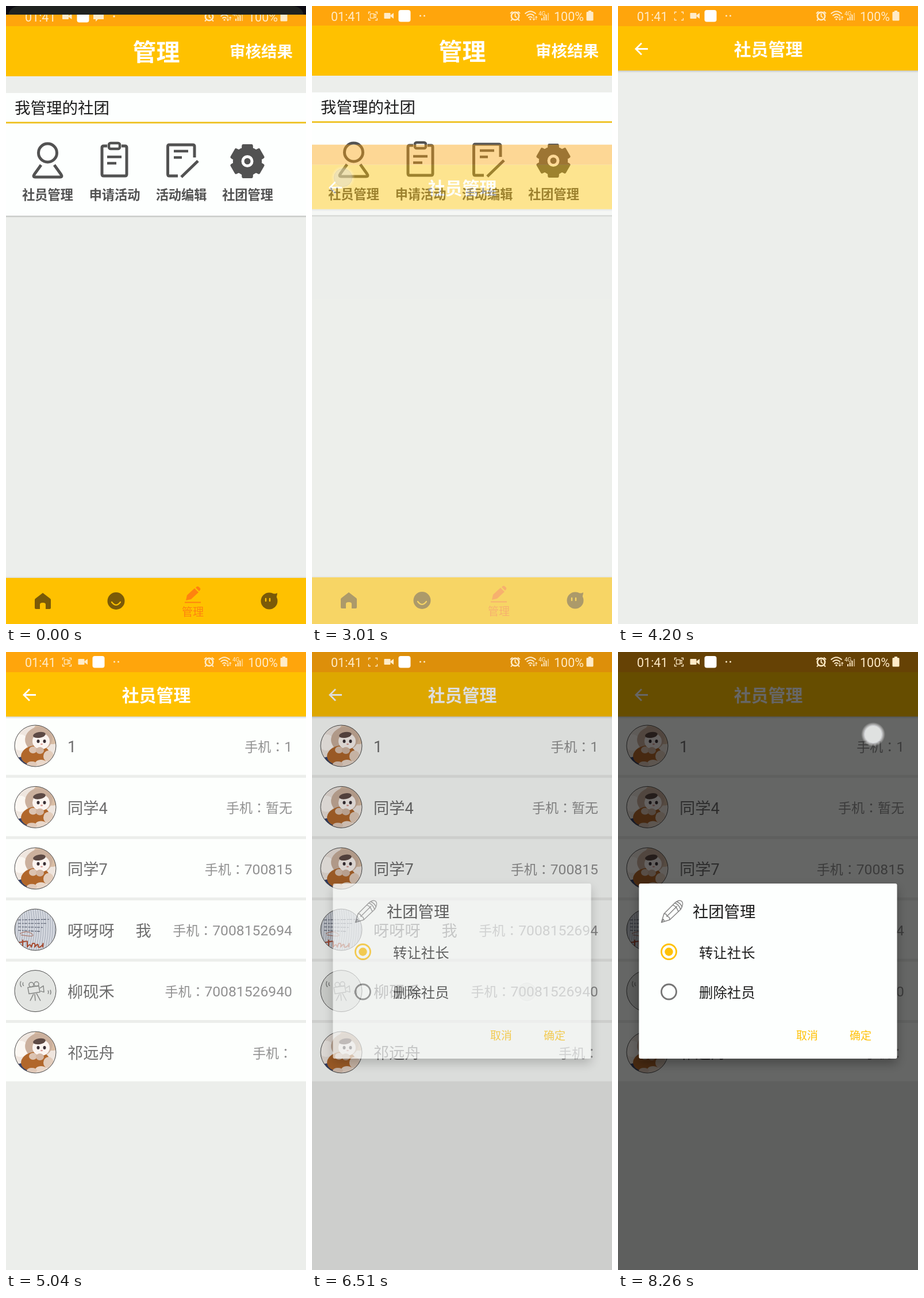
Write an HTML page that moves like this. It is 522 px wide and 1073 px high and loops after 8330 ms.

```html
<!DOCTYPE html>
<html lang="zh-CN">
<head>
<meta charset="utf-8">
<title>社员管理</title>
<style>
html, body { margin: 0; width: 100%; height: 100%; overflow: hidden; background: #eceeeb; }
svg { display: block; width: 522px; height: 1073px; }
text { font-family: Roboto, "Noto Sans CJK SC", "Noto Sans CJK", sans-serif; white-space: pre; }
.mid { font-family: "Noto Sans CJK JP", "Noto Sans CJK", sans-serif; }
</style>
</head>
<body>
<svg id="stage" viewBox="0 0 522 1073" xmlns="http://www.w3.org/2000/svg"></svg>
<script>
const LOOP = 8330, STEP = 70;
const BG = '#eceeeb', AMBER = '#ffc100', STATUS = '#ffa50c', INK = '#525252', BROWN = '#7a5a08';

// Markup helpers; cy is the visual centre of the line of text.
const text = (x, cy, size, fill, str, more = '') =>
  `<text x="${x}" y="${cy + size * 0.38}" font-size="${size}" fill="${fill}" ${more}>${str}</text>`;
const rect = (x, y, w, h, fill, more = '') =>
  `<rect x="${x}" y="${y}" width="${w}" height="${h}" fill="${fill}" ${more}/>`;
const circle = (x, y, r, fill, more = '') =>
  `<circle cx="${x}" cy="${y}" r="${r}" fill="${fill}" ${more}/>`;
const oval = (x, y, rx, ry, fill, turn = 0) =>
  `<ellipse cx="${x}" cy="${y}" rx="${rx}" ry="${ry}" fill="${fill}" transform="rotate(${turn} ${x} ${y})"/>`;
const line = (d, color, w, more = '') =>
  `<path d="${d}" fill="none" stroke="${color}" stroke-width="${w}" ${more}/>`;
const group = (id, body, more = '') => `<g id="${id}" ${more}>${body}</g>`;
const at = (x, y, body) => `<g transform="translate(${x} ${y})">${body}</g>`;
const BOLD = 'font-weight="700"', MIDDLE = 'text-anchor="middle"';
const ROUND = 'stroke-linecap="round" stroke-linejoin="round"';

function gear(x, y) {
  const pts = [];
  for (let i = 0; i < 6; i++) {
    for (const [turn, r] of [[-19, 23], [-15, 28], [15, 28], [19, 23]]) {
      const a = (i * 60 - 90 + turn) * Math.PI / 180;
      pts.push((x + r * Math.cos(a)).toFixed(1) + ',' + (y + r * Math.sin(a)).toFixed(1));
    }
  }
  return `<polygon points="${pts.join(' ')}" fill="${INK}" stroke="${INK}" stroke-width="5" stroke-linejoin="round"/>`
    + circle(x, y, 8, 'none', 'stroke="#fff" stroke-width="5"');
}

function homePage() {
  const tools = [['社员管理', 72.5], ['申请活动', 189], ['活动编辑', 305], ['社团管理', 420.5]];
  const icons =
    circle(72.5, 254, 16, 'none', `stroke="${INK}" stroke-width="5"`) +
    line('M61 275L49.5 291Q46 296 51 296H94Q99 296 95.5 291L84 275', INK, 5, 'stroke-linejoin="round"') +
    line('M176 242H170Q167 242 167 245V291Q167 294 170 294H207Q210 294 210 291V245Q210 242 207 242H201', INK, 5) +
    rect(179, 237, 19, 10, 'none', `rx="3" stroke="${INK}" stroke-width="4.5"`) +
    line('M176 261H201M176 272H192', INK, 4.5) +
    line('M299 294H284Q281.500 294 281.500 291V243Q281.500 240 284 240H325Q328 240 328 243V262', INK, 5) +
    line('M292 251H317M292 262H306', INK, 4.5) +
    line('M334 268L305 296', INK, 5) +
    gear(420, 268.5);
  const nav = rect(0, 992, 522, 82, AMBER) + rect(0, 990, 522, 2, '#000', 'opacity=".05"') +
    `<path d="M64 1018L77 1028Q78 1029 78 1030V1044Q78 1046 76 1046H69V1038Q69 1035 64 1035T59 1038V1046H52Q50 1046 50 1044V1030Q50 1029 51 1028Z" fill="${BROWN}"/>` +
    circle(191.5, 1032, 15, BROWN) + line('M184 1034Q191.500 1044 199 1034', AMBER, 2.2, ROUND) +
    `<path d="M313 1031L315 1022L328 1010L335 1017L322 1029ZM330 1009L332 1007Q334 1006 336 1008L338 1010Q339 1012 337 1014L336 1015Z" fill="#ff820f"/>` +
    line('M311 1034.500H339', '#ff820f', 2) +
    text(325, 1051, 19, '#ff820f', '管理', MIDDLE) +
    circle(458, 1032, 14.5, BROWN) + `<path d="M460 1018Q468 1021 472 1018Q472 1025 468 1028Z" fill="${BROWN}"/>` +
    line('M452 1028V1032M459 1028V1032', AMBER, 2.4, ROUND);
  return rect(0, 0, 522, 1074, BG) + rect(0, -2, 522, 36, STATUS) + rect(0, 34, 522, 87, AMBER) +
    text(261.5, 78, 41, '#fff', '管理', BOLD + MIDDLE) +
    text(389, 78, 27.5, '#fff', '审核结果', BOLD) +
    rect(0, 150, 522, 213, '#fdfffe') + rect(0, 200, 522, 3, '#efc52f') + rect(0, 363, 522, 2.5, '#cbcdca') +
    text(15, 176, 27.5, '#1c1c1c', '我管理的社团') + icons +
    tools.map(([s, x]) => text(x, 327, 22.2, INK, s, BOLD + MIDDLE)).join('') + nav;
}

const catPhoto =
  circle(0, 0, 36, '#efe6df') + oval(22, -22, 26, 18, '#d9bda4', 20) + oval(-26, -6, 13, 14, '#fbf7f2') +
  oval(-22, 31, 18, 12, '#33416e') + oval(6, -12, 24, 21, '#cbb09d', -15) +
  oval(0, 16, 25, 17, '#b1672b', -8) + oval(10, -8, 15, 14, '#fbf4f0') + oval(7, -19, 11, 5, '#5d4a45', -10) +
  oval(5, -8, 2.5, 3, '#3a3035') + oval(16, -8, 2.5, 3, '#3a3035') + oval(11, -3, 2, 1.3, '#d79a94') +
  oval(-4, 7, 7, 6, '#dcc3b1') + oval(8, 8, 7, 6, '#d3b7a4') +
  oval(23, 18, 9, 10, '#e3cdbc') + oval(10, 30, 10, 6, '#ead8ca') + oval(-6, 32, 9, 5, '#e0c9b9');

function sheetPhoto() {
  let s = circle(0, 0, 36, '#b9bec8');
  for (let i = -34; i < 36; i += 4) s += line(`M${i} -36Q${i + 6} 0 ${i - 3} 36`, '#dfe2e8', 1.6);
  for (let i = 0; i < 4; i++) s += line(`M-30 ${-17 + i * 6}L${24 - i * 5} ${-18 + i * 7}`, '#4d5365', 1.1, 'stroke-dasharray="5 2 3 1"');
  return s + oval(-14, 6, 10, 4, 'none') + line('M-27 7Q-15 0 -6 7T-25 9', '#a4624f', 1) +
    line('M-28 22L-16 20M-22 18V30M-14 20V30Q-9 22 -7 30L-5 24Q1 22 -1 30Q5 22 5 28T13 26Q14 20 13 30', '#a64a30', 2, ROUND);
}

const cameraArt = circle(0, 0, 36, '#e3e5e2') +
  `<g fill="none" stroke="#858785" stroke-width="1.5" stroke-linejoin="round">
  <path d="M-13 -6L6 -9L8 2L-11 5ZM8 -5L14 -9L15 2L9 0M-3 5L-9 17M-1 5L0 17M2 4L9 17"/>
  <circle cx="-7" cy="-11" r="4"/><circle cx="2" cy="-12" r="4"/>
  <path d="M-25 -17Q-28 -11 -24 -7M-21 -15Q-23 -11 -20 -9M22 5Q24 2 22 -1M26 6Q28 2 26 -2"/></g>`;

function memberPage() {
  const rows = [
    ['1', '1', catPhoto], ['同学4', '暂无', catPhoto], ['同学7', '700815', catPhoto],
    ['呀呀呀     我', '7008152694', sheetPhoto()], ['柳砚禾', '70081526940', cameraArt], ['祁远舟', '', catPhoto]
  ];
  let list = '', faces = '';
  rows.forEach(([name, phone, art], i) => {
    const y = 112 + i * 106.4, mid = y + 52;
    const size = /\d/.test(phone) ? 24.7 : 23;
    const label = `手机<tspan class="mid" lang="ja">：</tspan><tspan font-size="${size}">${phone}</tspan>`;
    list += rect(0, y, 522, 101.4, '#fdfffd');
    if (name.includes(' ')) {
      const [a, b] = name.split(/ +/);
      list += text(107, mid, 27.2, '#6e6e6e', a) + text(225.5, mid, 27.2, '#6e6e6e', b);
    } else list += text(107, mid, 27.2, '#6e6e6e', name);
    list += text(498, mid, 23, '#919191', label, 'text-anchor="end"');
    faces += at(51, y + 51, `<g clip-path="url(#disc)">${art}</g>` + circle(0, 0, 36, 'none', 'stroke="#4a4a4a" stroke-width="1"'));
  });
  return rect(0, 0, 522, 1073, BG) + group('list', list + group('faces', faces)) +
    rect(0, 112, 522, 4, 'url(#drop)') + rect(0, 0, 522, 35, STATUS) + rect(0, 35, 522, 77, AMBER) +
    line('M52 74.500H31.500M41 64.500L31 74.500L41 84.500', '#fff', 2.8) +
    text(261.5, 74.5, 29.9, '#fff', '社员管理', BOLD + MIDDLE);
}

function dialogBox() {
  const option = (y, color, str) =>
    circle(88.5, y, 13, 'none', `stroke="${color}" stroke-width="2.8"`) + text(141, y + 1, 24.4, '#1c1c1c', str);
  return rect(36.5, 402, 449, 304, '#fdfffe', 'rx="3" filter="url(#shade)"') +
    `<g fill="none" stroke="#858585" stroke-width="1.5" stroke-linejoin="round">
    <path d="M75.500 469.500L80 454.500L99 435.500Q107 429 111 433T109 447L90 465ZM80 454.500Q85 454 85 459Q90 459 90 465M85 459L103 441M95 439.500Q101 440 105 450.500M98.500 436Q105 437 109 447M102 433.500Q109 436 111.500 443M75.500 469.500L79 464L81 467.500Z"/></g>` +
    text(130, 451, 27.3, '#1c1c1c', '社团管理') +
    option(520.5, '#ffc107', '转让社长') + circle(88.5, 520.5, 7.2, '#ffc107') +
    option(590, '#757575', '删除社员') +
    text(310, 666, 19, '#ffc107', '取消', 'font-weight="500"') + text(403, 666, 19, '#ffc107', '确定', 'font-weight="500"');
}

function statusBar() {
  const c = '#ffebc8';
  const film = x => at(x, 17, rect(-8, -5, 11, 10, c, 'rx="1"') + `<path d="M3 -1L8.500 -5V5L3 1Z" fill="${c}"/>`);
  const badge = x => rect(x - 10.5, 7, 21, 20.5, '#fff', 'rx="4"');
  const early = film(106) + badge(134) +
    `<path d="M152 11H170V22H160L156 26V22H152Z" fill="${c}"/>` + circle(188, 17, 1.7, c);
  const late = line('M98.500 14V10.500H102M110 10.500H113.500V14M113.500 21V24.500H110M102 24.500H98.500V21', c, 1.3) +
    group('rec', rect(101.5, 13.5, 6.5, 7.5, 'none', `stroke="${c}" stroke-width="1.3"`) + line('M108 16L111 14V20.500L108 18.500', c, 1.2)) +
    film(133.5) + badge(161) + circle(188.5, 17, 1.5, c) + circle(195.5, 17, 1.5, c);
  const right = circle(353.5, 17.5, 6.6, 'none', `stroke="${c}" stroke-width="2.6"`) +
    line('M353.500 13V18L356.500 20M345 13L349 9.500M362 13L358 9.500M348.500 23L346 25.500M358.500 23L361 25.500', c, 1.9) +
    line('M370.500 13.500Q380 5 389.500 13.500M373.500 17Q380 11 386.500 17M376.500 20.500Q380 17 383.500 20.500', c, 2) +
    circle(380, 23, 1.6, c) +
    group('arrows', line('M386 18V24M384 22L386 24.500L388 22M390 24V18M388.500 20L390 18L392 20', c, 1.1)) +
    text(394, 13.5, 10, c, '4G') +
    [0, 1, 2, 3].map(i => rect(399 + i * 3.7, 21 - i * 3, 2, 4 + i * 3, c, i > 2 ? 'opacity=".55"' : '')).join('') +
    text(421, 17.5, 21.5, c, '100%') + rect(477.5, 10, 12, 15.5, c, 'rx="1.5"') + rect(481, 8, 5, 3, c);
  return text(33, 17.5, 21.5, c, '01:41') + group('early', early) + group('late', late) + right;
}

const stage = document.getElementById('stage');
stage.innerHTML = `<defs>
  <clipPath id="disc"><circle r="36"/></clipPath>
  <linearGradient id="drop" x2="0" y2="1"><stop stop-color="#000" stop-opacity=".16"/><stop offset="1" stop-color="#000" stop-opacity="0"/></linearGradient>
  <radialGradient id="glow"><stop offset=".7" stop-color="#fff" stop-opacity=".75"/><stop offset="1" stop-color="#fff" stop-opacity="0"/></radialGradient>
  <filter id="shade" x="-10%" y="-10%" width="120%" height="125%"><feDropShadow dx="0" dy="8" stdDeviation="9" flood-opacity=".3"/></filter>
  </defs>` +
  group('home', homePage()) + rect(0, 0, 522, 1073, '#000', 'id="under"') +
  group('members', memberPage()) + rect(0, 0, 522, 1073, '#000', 'id="dim"') +
  group('dialog', dialogBox()) + group('status', statusBar()) +
  group('panel', rect(0, -20, 522, 35, '#0c0a12') + '<path d="M4 15Q7 1 24 0H498Q515 1 518 15Z" fill="#202220"/>') +
  group('touch', circle(0, 0, 21, 'url(#glow)') + circle(0, 0, 15.5, '#dfe1e0', 'stroke="#c4c6cc" stroke-width="1"'));

const el = id => document.getElementById(id);
const set = (id, attrs) => { for (const k in attrs) el(id).setAttribute(k, attrs[k]); };
const ramp = (t, a, b) => Math.min(1, Math.max(0, (t - a) / (b - a)));
const within = (t, spans) => spans.some(([a, b]) => t >= a && t < b);
const show = (id, o) => set(id, { opacity: o, visibility: o > 0 ? 'visible' : 'hidden' });

const REC_OFF = [[1750, 2240], [2590, 2800], [3430, 3710], [4200, 4620], [5250, 5530], [5950, 6160], [6400, 7140], [7630, 8120]];
// x, y, appear, start of fade, end of fade, strength
const TOUCHES = [[54, 298, 2730, 2870, 3150, 0.9], [374, 590, 6300, 6370, 6540, 0.9], [444, 143, 8260, 8330, 8400, 1]];

function draw(t) {
  set('panel', { transform: `translate(0 ${-17 * ramp(t, 0, 210)})` });
  set('home', { transform: `translate(0 ${t < 210 ? 1 : 0})` });
  set('status', { transform: `translate(0 ${t < 210 ? 1 : 0})` });
  show('early', t < 280 ? 1 : 0);
  show('late', t < 280 ? 0 : 1);
  show('rec', t < 280 || within(t, REC_OFF) ? 0 : 1);
  show('arrows', within(t, [[840, 1260]]) ? 0.5 : 1);

  const p = ramp(t, 2900, 3290);
  set('members', { transform: `translate(0 ${642 * (1 - p) ** 2.96})` });
  show('members', ramp(t, 2900, 3155));
  show('under', 0.3 * ramp(t, 3010, 3220));

  show('list', ramp(t, 4690, 4830));
  show('faces', ramp(t, 4760, 4970));

  show('dim', 0.6 * ramp(t, 6430, 6650) ** 1.5);
  show('dialog', ramp(t, 6440, 6548));

  const hit = TOUCHES.find(k => t >= k[2] && t < k[4]);
  if (hit) set('touch', { transform: `translate(${hit[0]} ${hit[1]})` });
  show('touch', hit ? hit[5] * (1 - ramp(t, hit[3], hit[4])) : 0);
}

const start = performance.now();
function tick() {
  const t = (performance.now() - start) % LOOP;
  draw(Math.floor(t / STEP) * STEP);
  requestAnimationFrame(tick);
}
tick();
</script>
</body>
</html>
```
